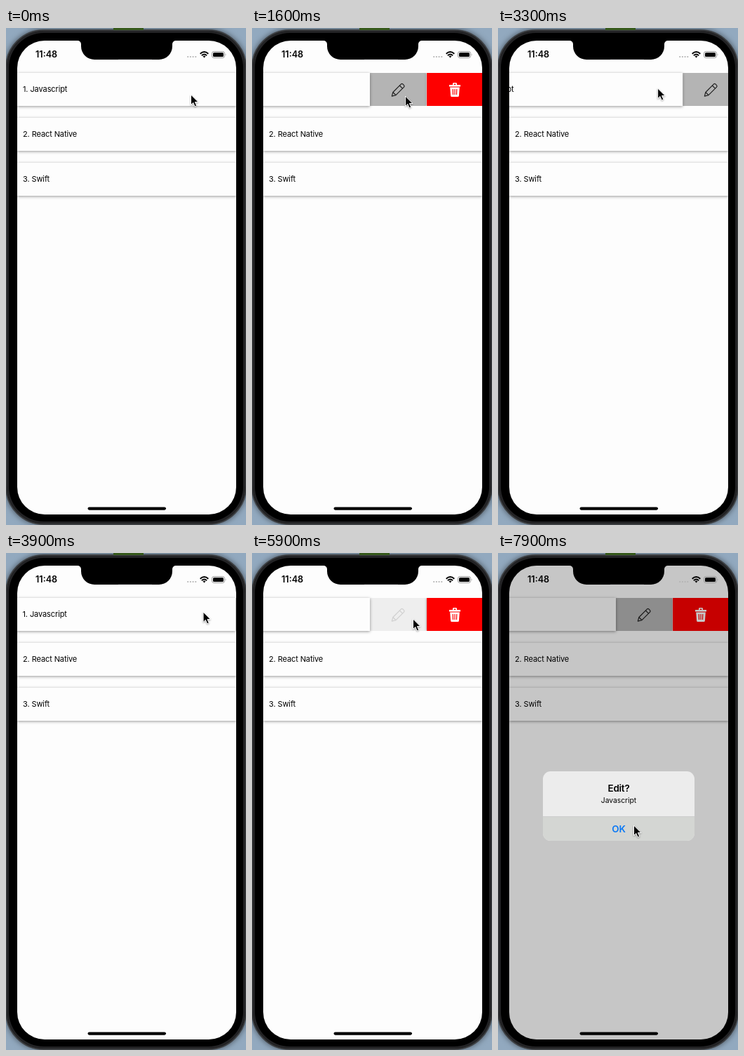
Animation, 342 px wide and 708 px high, one loop 8 s. Source, as an HTML page:

```html
<!DOCTYPE html>
<html lang="en">
<head>
<meta charset="utf-8">
<title>Swipeable list</title>
<style>
html, body { margin: 0; width: 100%; height: 100%; overflow: hidden; background: #92a9bf; }
body { position: relative; font: 11px/1 Inter, "Open Sans", sans-serif; color: #000; }
div, svg { position: absolute; box-sizing: border-box; }
#leaf { left: 153px; top: 0; width: 43px; height: 3px; background: #36591b; }
#phone { left: -1px; top: 2px; width: 344px; height: 706px; border-radius: 55px; background: #000;
  border: 2px solid #3c3e41; box-shadow: inset 0 0 0 3px #232325, 0 0 9px rgba(0, 0, 0, .55); }
#screen { left: 16px; top: 18px; width: 312px; height: 675px; border-radius: 39px; background: #fdfdfd; overflow: hidden; }
.card { left: 0; width: 312px; height: 47px; padding-left: 8px; line-height: 46px; letter-spacing: -.1px;
  background: #fdfdfd; box-shadow: 0 1px 4px rgba(0, 0, 0, .42); white-space: nowrap; }
#actions { top: 46px; width: 160px; height: 47px; overflow: hidden; }
#actions div { width: 80px; height: 47px; }
#edit { left: 0; background: #b4b4b4; }
#trash { left: 81px; background: #fe0000; box-shadow: 0 0 3px rgba(0, 0, 0, .5); }
#dim { inset: 0; background: rgba(0, 0, 0, .22); }
#alert { left: 48px; top: 293px; width: 216px; height: 99px; border-radius: 11px; background: #ececec; overflow: hidden; text-align: center; }
#alert div { left: 0; width: 100%; }
#alert b { font-weight: 600; font-size: 13.4px; letter-spacing: -.2px; }
#ok { top: 64px; height: 35px; line-height: 35px; border-top: 1px solid #cdcdcd; color: #0a78f5; }
#top { left: 0; top: 0; }
</style>
</head>
<body>
<div id="phone"></div>
<div id="leaf"></div>
<div id="screen">
  <div id="actions">
    <div id="edit">
      <svg style="left:30px;top:14px" width="21" height="21" fill="none" stroke="#222" stroke-width="1.2" stroke-linejoin="round">
        <path d="M1.3 19.2L2.9 13.5 14.2 2.2Q15.7.7 17.2 2.2L18.3 3.3Q19.8 4.8 18.3 6.3L7 17.6ZM12.4 4L16.5 8.1M2.9 13.5L7 17.6"/>
      </svg>
    </div>
    <div id="trash">
      <svg style="left:32px;top:14px" width="17" height="21">
        <path d="M5 3V1.4Q5 0 6.4 0H9.6Q11 0 11 1.4V3H16V5.5H0V3ZM6.7 3H9.3V1.6H6.7ZM1.2 6.5H14.8L13.9 18.4Q13.8 20 12.2 20H3.8Q2.2 20 2.1 18.4Z" fill="#fff" fill-rule="evenodd"/>
        <path d="M5.2 9L5.5 17M8 9V17M10.8 9L10.5 17" stroke="#fe0000" stroke-width="1.2"/>
      </svg>
    </div>
  </div>
  <div class="card" id="first" style="top:46px">1. Javascript</div>
  <div class="card" style="top:110px">2. React Native</div>
  <div class="card" style="top:174px">3. Swift</div>
  <div id="dim"></div>
  <div id="alert">
    <div style="top:18px"><b>Edit?</b></div>
    <div style="top:36px;font-size:10.3px">Javascript</div>
    <div id="ok"><b>OK</b></div>
  </div>
</div>
<svg id="top" width="342" height="708">
  <path d="M102 17V18A5 5 0 0 1 107 23V26A19 19 0 0 0 126 45H218A19 19 0 0 0 237 26V23A5 5 0 0 1 242 18V17Z"/>
  <path d="M160 44.5H208" stroke="#1c1c1e"/>
  <text x="42" y="42.3" font-size="12.6" font-weight="600">11:48</text>
  <path d="M259.2 41H272" stroke="#b3b3b3" stroke-width="2.2" stroke-linecap="round" stroke-dasharray="0 3.7"/>
  <g fill="none" stroke="#000" stroke-width="1.9">
    <path d="M276.7 36.8Q282.5 31.4 288.3 36.8M278.9 39.2Q282.5 36 286.1 39.2"/>
    <path d="M280.5 40.3Q282.5 38.8 284.5 40.3L282.5 42.4Z" fill="#000" stroke="none"/>
  </g>
  <rect x="293.5" y="33.5" width="18" height="9" rx="2.7" fill="none" stroke="#999"/>
  <rect x="295" y="35" width="15" height="6" rx="1.5"/>
  <path d="M312.8 36.5Q314.3 38 312.8 39.5Z" fill="#999"/>
  <rect x="116.5" y="682.5" width="111.5" height="4.2" rx="2.1"/>
  <path id="cursor" d="M.5 0V14.5L3.8 11.4 6.1 16.8 8.7 15.7 6.4 10.5H11Z" stroke="#fff"
    style="filter:drop-shadow(0 1px 1px rgba(0,0,0,.35))"/>
</svg>
<script>
const LOOP = 8000, STEP = 100, WIDTH = 312, ACTIONS = 160;
const $ = id => document.getElementById(id);

// Eased 0 to 1 between two times.
function ramp(t, from, to) {
  const u = Math.min(1, Math.max(0, (t - from) / (to - from)));
  return u * u * (3 - 2 * u);
}

const open1 = [100, 1000], close = [2460, 3950], open2 = [3950, 4950];

// The pointer glides from spot to spot; three of the glides drag the card.
const home = { x: 263, y: 95 };
const glides = [
  { when: open1, x: 126, y: 93 },
  { when: [1000, 1600], x: 218, y: 97 },
  { when: [1800, 2300], x: 148, y: 89 },
  { when: close, x: 281, y: 84 },
  { when: open2, x: 126, y: 93 },
  { when: [5000, 5700], x: 229, y: 94 },
  { when: [6050, 6400], x: 248, y: 277 },
  { when: [6400, 6900], x: 193, y: 388 }
];

function pointer(t) {
  return glides.reduce((p, { when, x, y }) => {
    const k = ramp(t, ...when);
    return { x: p.x + (x - p.x) * k, y: p.y + (y - p.y) * k };
  }, home);
}

function draw(now) {
  const t = Math.floor(now % LOOP / STEP) * STEP;
  const { x, y } = pointer(t);
  const offset = ACTIONS * (ramp(t, ...open1) - ramp(t, ...close) + ramp(t, ...open2));
  const pressed = ramp(t, 5700, 5850) - ramp(t, 6050, 6300);

  $("cursor").setAttribute("transform", `translate(${x} ${y})`);
  $("first").style.transform = `translateX(${-offset}px)`;
  $("actions").style.left = WIDTH - offset + "px";
  $("edit").style.opacity = 1 - .8 * pressed;
  $("dim").style.opacity = ramp(t, 5900, 6100);
  $("alert").style.opacity = ramp(t, 6000, 6250);
  $("alert").style.transform = `scale(${1.18 - .18 * ramp(t, 6050, 6400)})`;
  $("ok").style.background = t >= 6900 ? "#d4d6d3" : "none";
}

const start = performance.now();
function tick() {
  draw(performance.now() - start);
  requestAnimationFrame(tick);
}
tick();
</script>
</body>
</html>
```
